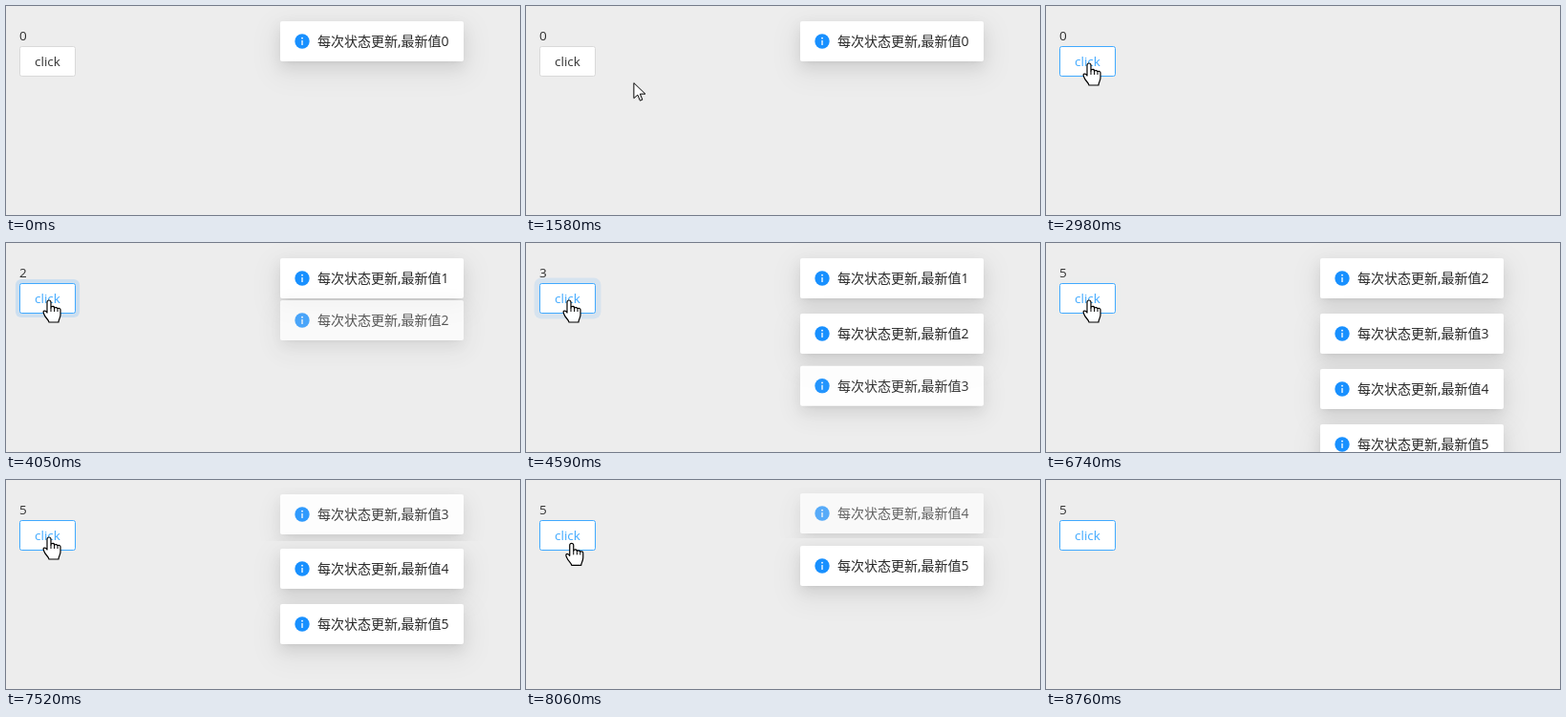
Recreate the animation shown at these times as an HTML page. Size 538 px wide and 219 px high, loop 8990 ms.

```html
<!DOCTYPE html>
<html lang="zh-CN">
<head>
<meta charset="utf-8">
<style>
  html, body { margin: 0; width: 100%; height: 100%; overflow: hidden; background: #ededed; }
  body { position: relative; font: 14px "Open Sans", "Noto Sans CJK SC", "Noto Sans CJK", sans-serif; }
  #scene { position: absolute; left: 0; top: 0; }
  #messages { position: absolute; left: 226px; top: 8px; width: 312px; color: rgba(0, 0, 0, .85); }
  .notice { box-sizing: border-box; padding: 8px 0; }
  .content {
    box-sizing: border-box; display: flex; width: max-content; height: 42px;
    margin-left: 60.5px; padding: 10px 16px 10px 15.5px; line-height: 22px; white-space: nowrap;
    background: #fff; border-radius: 2px;
    box-shadow: 0 3px 6px -4px rgba(0, 0, 0, .12), 0 6px 16px rgba(0, 0, 0, .08), 0 9px 28px 8px rgba(0, 0, 0, .05);
  }
  .content svg { margin: 3px 8px 0 0; }
</style>
</head>
<body>
<svg id="scene" width="538" height="219" viewBox="0 0 538 219">
  <text id="count" x="14" y="36" font-size="13.5" fill="#000" fill-opacity=".8">0</text>
  <rect id="wave" fill="#1890ff"/>
  <rect id="button" x="14.5" y="42.5" width="58" height="31" rx="2" fill="#fff"/>
  <text id="label" x="43.5" y="63" font-size="13.5" text-anchor="middle">click</text>
  <g id="cursor" fill="#fff" stroke="#000" stroke-linejoin="round">
    <path id="arrow" d="M0 0V16L4 12.5L6.5 18.5L9 17.5L6.5 11.5H12Z"/>
    <g id="hand">
      <path stroke-width="1.2" d="M-2 13V2a2 2 0 0 1 4 0V8a1.8 1.8 0 0 1 3.6 .5a1.8 1.8 0 0 1 3.4 .8a1.6 1.6 0 0 1 3 1V15c0 4-2 5-2 8H0c0-2-4-5-5-8c-1-2-1.5-3-.5-3.7c1-.7 2.5 .2 3.5 1.7z"/>
      <path fill="none" d="M2 8v4M5.6 9v3M9 10v2"/>
    </g>
  </g>
</svg>
<div id="messages"></div>
<script>
const LOOP = 8990;
const CLICKS = [3450, 3980, 4440, 4900, 5460];
const MOUNT_DELAY = 17, STAY = 2920, FADE = 300;

const $ = id => document.getElementById(id);
const clamp = v => Math.min(1, Math.max(0, v));
const mix = (a, b, p) => a + (b - a) * p;
const smooth = p => p * p * (3 - 2 * p);

function bezier(x1, y1, x2, y2) {
  const axis = (a, b, s) => 3 * a * s * (1 - s) ** 2 + 3 * b * s * s * (1 - s) + s ** 3;
  return x => {
    if (x <= 0 || x >= 1) return clamp(x);
    let lo = 0, hi = 1;
    for (let i = 0; i < 24; i++) {
      const mid = (lo + hi) / 2;
      if (axis(x1, x2, mid) < x) lo = mid; else hi = mid;
    }
    return axis(y1, y2, lo);
  };
}
const easeOutCirc = bezier(.08, .82, .17, 1);
const easeInCirc = bezier(.6, .04, .98, .34);

const notices = [-1000, ...CLICKS].map((click, value) => {
  const el = document.createElement('div');
  el.className = 'notice';
  el.innerHTML = `<div class="content"><svg width="16" height="16">
    <circle cx="8" cy="8" r="7.7" fill="#1890ff"/>
    <path d="M8 7v5" stroke="#fff" stroke-width="1.3"/><circle cx="8" cy="4.7" r=".9" fill="#fff"/>
    </svg><span>每次状态更新,最新值${value}</span></div>`;
  $('messages').append(el);
  const start = click + MOUNT_DELAY;
  return { el, start, leave: value ? start + STAY : 2680 };
});

function drawNotice({ el, start, leave }, t) {
  const shown = t >= start && t < leave + FADE;
  el.style.display = shown ? 'block' : 'none';
  if (!shown) return;
  const enter = easeOutCirc(clamp((t - start) / FADE));
  const rest = 1 - easeInCirc(clamp((t - leave) / FADE));
  const leaving = t >= leave;
  el.style.opacity = enter * rest;
  el.style.transform = enter < 1 ? `translateY(${-58 * (1 - enter)}px)` : 'none';
  el.style.padding = `${8 * rest}px 0`;
  el.style.maxHeight = leaving ? `${150 * rest}px` : 'none';
  el.style.overflow = leaving ? 'hidden' : 'visible';
}

// Each stretch: start time, end time, from, to
const PATH = [
  [570, 800, [447, 213], [433, 178]],
  [950, 1810, [433, 178], [45, 60]],
  [8030, 8290, [45, 60], [115, 222]],
];

function drawCursor(t) {
  const visible = t >= PATH[0][0] && t < PATH[2][1];
  $('cursor').style.display = visible ? '' : 'none';
  if (!visible) return;
  const [from, to, a, b] = PATH.filter(leg => t >= leg[0]).pop();
  const p = smooth(clamp((t - from) / (to - from)));
  const x = mix(a[0], b[0], p), y = mix(a[1], b[1], p);
  const over = x < 73 && y < 74;
  $('cursor').setAttribute('transform', `translate(${x} ${y})`);
  $('hand').style.display = over ? '' : 'none';
  $('arrow').style.display = over ? 'none' : '';
}

function drawButton(t) {
  const p = smooth(clamp((t - 1670) / 300));
  const tint = (grey, blue) => `rgb(${blue.map((c, i) => Math.round(mix(grey, c, p)))})`;
  const blue = [64, 169, 255];
  $('button').setAttribute('stroke', tint(217, blue));
  $('label').setAttribute('fill', tint(50, blue));

  const done = CLICKS.filter(c => t >= c);
  $('count').textContent = done.length;
  const age = done.length ? t - done[done.length - 1] - MOUNT_DELAY : Infinity;
  const spread = 6 * easeOutCirc(clamp(age / 400));
  const box = { x: 14 - spread, y: 42 - spread, width: 59 + 2 * spread, height: 32 + 2 * spread, rx: 2 + spread };
  for (const key in box) $('wave').setAttribute(key, box[key]);
  $('wave').setAttribute('opacity', .2 * (1 - easeOutCirc(clamp(age / 2000))));
}

function draw(t) {
  drawButton(t);
  drawCursor(t);
  notices.forEach(n => drawNotice(n, t));
}

const begin = performance.now();
function tick() {
  draw((performance.now() - begin) % LOOP);
  requestAnimationFrame(tick);
}
tick();
</script>
</body>
</html>
```
